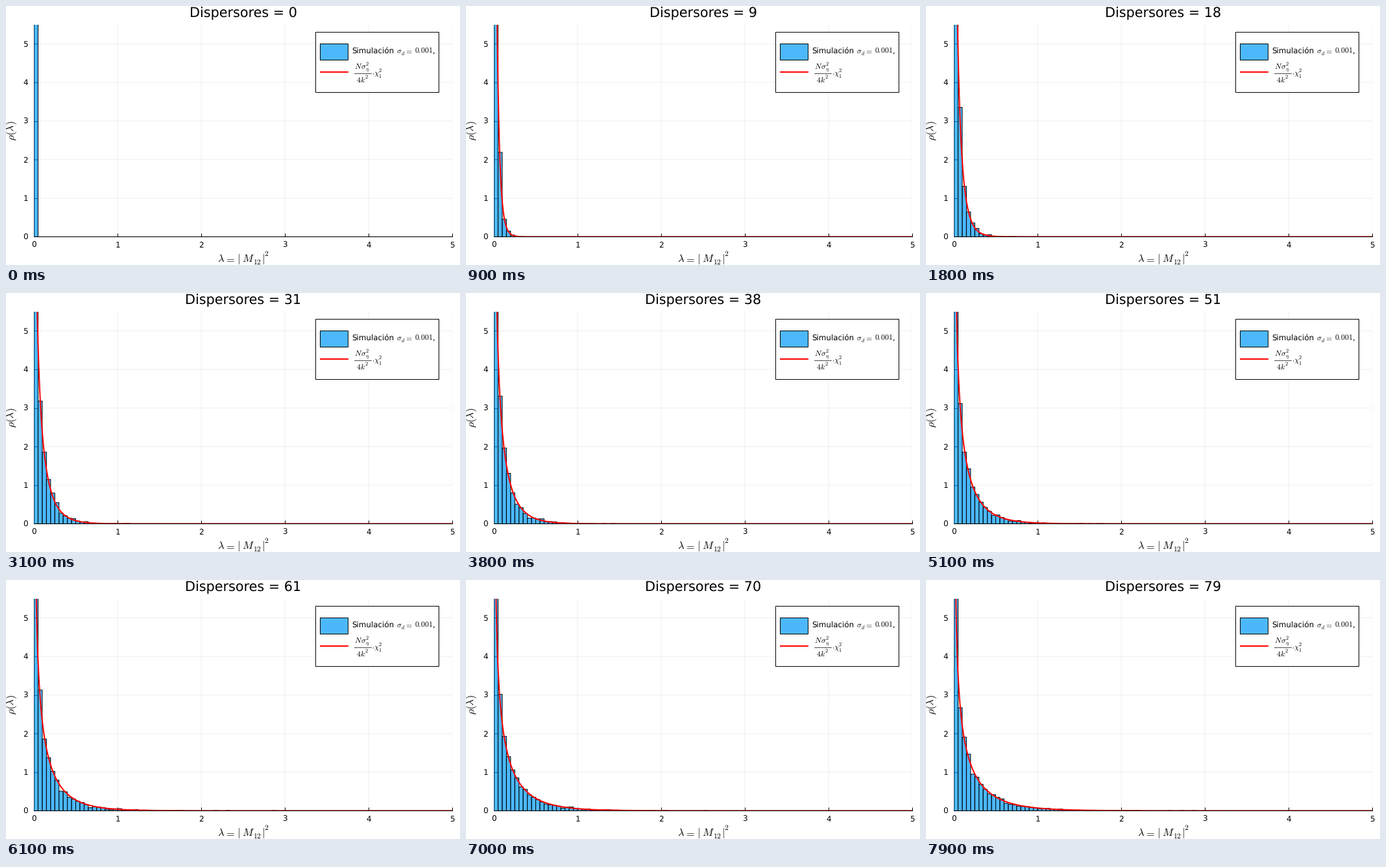
A matplotlib script for the animation above (8 s loop, 700 by 400 pixels).

```python
import numpy as np
import matplotlib.pyplot as plt
from matplotlib.animation import FuncAnimation
from matplotlib.patches import Rectangle

W, H, DPI = 700, 400, 100
FRAMES, INTERVAL = 80, 100
PX = 72 / DPI  # points per pixel
LEFT, RIGHT, TOP, BOTTOM = 43, 688, 28.6, 356.4
X_MAX, Y_MAX = 5, 5.5
BIN, SAMPLES = 0.05, 5000
VARIANCE = 0.0025  # added by each scatterer
SKY = (0, 154 / 255, 250 / 255, 0.7)

plt.rcParams["font.family"] = "DejaVu Sans"
plt.rcParams["mathtext.fontset"] = "cm"
plt.rcParams["text.hinting"] = "no_hinting"

fig = plt.figure(figsize=(W / DPI, H / DPI), dpi=DPI, facecolor="white")
ax = fig.add_axes([LEFT / W, 1 - BOTTOM / H, (RIGHT - LEFT) / W, (BOTTOM - TOP) / H])
page = fig.add_axes([0, 0, 1, 1], zorder=5)
page.set(xlim=(0, W), ylim=(H, 0))
page.axis("off")


def label(x, y, text, size, ha="left", **style):
    style.setdefault("va", "baseline")
    return page.text(x, y, text, fontsize=size * PX, ha=ha, **style)


def formula(size, *parts):
    """Place (x, baseline, tex) pieces; scripts start with _ or ^."""
    for x, y, tex in parts:
        scale = 0.7 if tex[0] in "_^" else 1
        label(x, y, f"${tex.lstrip('_^')}$", size * scale)


def box(x, y, w, h, fill):
    page.add_patch(Rectangle((x, y), w, h, fc=fill, ec="black", lw=PX))


# Axes and grid
ax.set(xlim=(0, X_MAX), ylim=(0, Y_MAX), xticks=range(6), yticks=range(6))
ax.set_axisbelow(True)
ax.grid(color="black", alpha=0.06, lw=PX, snap=False)
ax.tick_params(direction="in", length=5 * PX, width=PX, labelbottom=False, labelleft=False)
for side in ("top", "right"):
    ax.spines[side].set_visible(False)
for side in ("left", "bottom"):
    ax.spines[side].set(linewidth=PX, zorder=1)

for n in range(6):
    label(LEFT + n * (RIGHT - LEFT) / X_MAX, 373, str(n), 11.9, "center")
    label(30, BOTTOM - n * (BOTTOM - TOP) / Y_MAX + 4.3, str(n), 11.9, "center")

title = label(365.5, 18, "", 20.8, "center")
label(9, 192.5, r"$\rho(\lambda)$", 16.3, "center", va="center", rotation=90)
formula(16.3,
        (325.5, 395, r"\lambda"), (337, 395, "="), (356, 395, "|"),
        (364, 395, "M"), (381, 399, "_12"), (394.5, 395, "|"), (397.5, 386, "^2"))

# Legend
box(476.5, 39.5, 190, 93, "white")
box(484, 58, 43, 25, SKY)
page.plot([484, 527.5], [102, 102], color="red", lw=2 * PX, solid_capstyle="butt")
label(533.5, 73, "Simulación", 11.9)
label(657, 73, ",", 11.9)
formula(11.9,
        (601.5, 73, r"\sigma"), (609, 75.5, "_d"), (614.5, 73, "="), (629.5, 73, "0.001"),
        (537, 97, "N"), (547, 97, r"\sigma"), (554, 92, "^2"), (553.5, 100, r"_\eta"),
        (540, 118, "4"), (546, 118, "k"), (553, 112, "^2"),
        (564.3, 106.5, r"\cdot"), (567, 107, r"\chi"), (574, 102.5, "^2"), (574, 111, "_1"))
page.plot([537, 563], [103.5, 103.5], color="black", lw=0.7 * PX)

# Histogram and theoretical curve
edges = np.linspace(0, X_MAX, round(X_MAX / BIN) + 1)
bars = ax.bar(edges[:-1], np.zeros(len(edges) - 1), BIN, align="edge",
              fc=SKY, ec="black", lw=PX, snap=False, zorder=2)
xs = np.concatenate([np.linspace(0.002, 0.5, 400), np.linspace(0.505, X_MAX, 300)])
curve, = ax.plot([], [], color="red", lw=2 * PX, zorder=3)


def densities(n):
    z = np.random.default_rng(n).standard_normal(SAMPLES)
    counts, _ = np.histogram(VARIANCE * n * z ** 2, edges)
    return counts / (SAMPLES * BIN)


def chi_square(x, a):
    return np.exp(-x / (2 * a)) / np.sqrt(2 * np.pi * a * x)


def update(n):
    title.set_text(f"Dispersores = {n}")
    for bar, h in zip(bars, densities(n)):
        bar.set_height(h)
    if n:
        curve.set_data(xs, chi_square(xs, VARIANCE * n))
    else:
        curve.set_data([], [])
    return title, curve, *bars


anim = FuncAnimation(fig, update, frames=FRAMES, interval=INTERVAL,
                     repeat=True, repeat_delay=0, blit=False)
plt.show()
```
